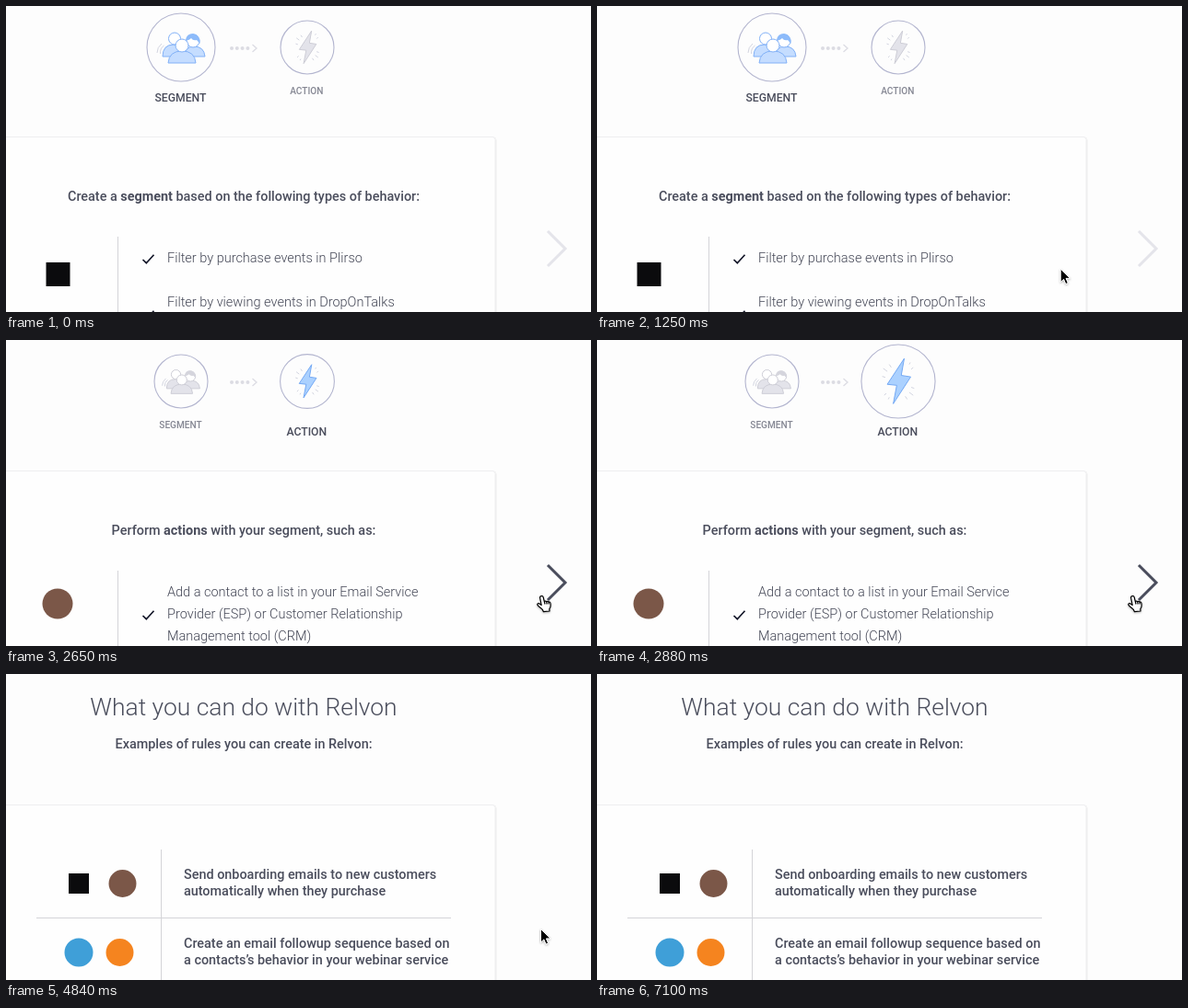
Recreate the animation shown at these times as an HTML page. Size 635 by 333 pixels, loop 7540 ms.

```html
<!DOCTYPE html>
<html lang="en">
<head>
<meta charset="utf-8">
<title>Segments and actions</title>
<style>
  html, body { margin: 0; width: 100%; height: 100%; overflow: hidden; background: #fdfdfd; }
  svg { display: block; }
  text { font-family: Roboto, Inter, "Liberation Sans", sans-serif; fill: #4a4d5c; }
  .title { font-size: 26.4px; font-weight: 300; text-anchor: middle; }
  .lead { font-size: 14.4px; font-weight: 450; text-anchor: middle; }
  .lead tspan { font-weight: 700; }
  .body { font-size: 14.5px; font-weight: 300; fill: #434655; }
  .row { font-size: 14.4px; font-weight: 450; }
  .label { font-size: 10.1px; font-weight: 500; fill: #858793; text-anchor: middle; }
  .label.on { font-size: 12.2px; fill: #4a4d5c; }
  .line { fill: none; stroke: #d4d4d8; }
  .check { fill: none; stroke: #15182a; stroke-width: 1.7; }
  .icon * { vector-effect: non-scaling-stroke; }
  .icon { --fill: #e3e3ea; --edge: #cdcdd6; --hair: #d5d5dd; }
  .icon.on { --fill: #c5ddff; --edge: #82b1f7; --hair: #8dbbfa; }
  .bolt.on { --fill: #abd1ff; --edge: #74a9f4; }
  .ring { fill: #fdfdfd; stroke: #b3b5cf; stroke-width: 1.1; }
  .part { fill: var(--fill); stroke: var(--edge); }
  .head { fill: #fff; stroke: var(--edge); }
  .hair { fill: var(--hair); }
  .spark { fill: none; stroke: #d3d5e0; }
</style>
</head>
<body>
<svg width="635" height="333" viewBox="0 0 635 333">
  <defs>
    <path id="tick" d="M148.5 276 L152.3 279.7 L160.5 270.7"/>
    <filter id="soft" x="-5%" y="-5%" width="110%" height="110%">
      <feDropShadow dx=".5" dy=".5" stdDeviation=".6" flood-color="#000" flood-opacity=".13"/>
    </filter>
    <filter id="drop" x="-40%" y="-30%" width="190%" height="180%">
      <feDropShadow dx="0" dy="1" stdDeviation=".8" flood-color="#000" flood-opacity=".3"/>
    </filter>
  </defs>

  <rect x="-20" y="142.5" width="551" height="230" rx="3" fill="#fefefe" stroke="#eeeef0" filter="url(#soft)"/>

  <g id="steps">
    <g id="people" class="icon">
      <circle class="ring" r="37"/>
      <path class="spark" d="M-26 6 Q-26 0 -21 -4 M-22.500 7 Q-23 1 -18.500 -2"/>
      <path class="part" d="M-20 10 Q-20 -3 -8 -3 Q0 -3 2 10Z"/>
      <path class="part" d="M4 10 Q4 -1 14 -1 Q25 -1 26 10Z"/>
      <circle class="head" cx="-7" cy="-9.500" r="6.500"/>
      <circle class="head" cx="13" cy="-7" r="7"/>
      <path class="hair" d="M5 -8 Q6 -15 13 -15 Q21 -14 20.500 -4 L17 -8 Q13 -7 11 -10 Q8 -7 5 -8Z"/>
      <path class="part" d="M-14 17 Q-13 4 1 4 Q15 4 16 17Z"/>
      <circle class="head" cx="1" cy="-2" r="7"/>
    </g>
    <g id="bolt" class="icon bolt">
      <circle class="ring" r="37"/>
      <path class="spark" d="M-11 -10 l-4 -3 M-13 -4 l-3 -1 M-7 -14 l-2 -3 M11 11 l4 3 M13 6 l3 1 M7 15 l2 3 M-12 12 l-2 2 M-9 16 l-1 2 M13 -12 l2 -2 M11 -17 l1 -2"/>
      <path class="part" d="M6 -23 L-11 3 L-1.500 4 L-5 22.500 L12.500 -4.500 L3 -6Z"/>
    </g>
    <g fill="#dcdce3">
      <circle cx="245" cy="46" r="2"/><circle cx="250.800" cy="46" r="2"/>
      <circle cx="256.600" cy="46" r="2"/><circle cx="262.400" cy="46" r="2"/>
    </g>
    <path d="M267.500 42 L272 46 L267.500 50" fill="none" stroke="#dcdce3" stroke-width="1.300"/>
    <text id="peopleLabel" class="label" x="189.500">SEGMENT</text>
    <text id="boltLabel" class="label" x="326.300">ACTION</text>
    <path class="line" d="M121.500 251 V333"/>
    <path id="next" d="M588 245 L607 264 L588 283" fill="none" stroke-width="3"/>
  </g>

  <g id="segment">
    <text class="lead" x="258" y="212">Create a <tspan>segment</tspan> based on the following types of behavior:</text>
    <rect x="43.500" y="279" width="26" height="26" fill="#0b0b0d"/>
    <use href="#tick" class="check"/>
    <use href="#tick" class="check" y="61"/>
    <text class="body" x="175" y="279">Filter by purchase events in Plirso</text>
    <text class="body" x="175" y="327">Filter by viewing events in DropOnTalks</text>
  </g>

  <g id="action">
    <text class="lead" x="258" y="212">Perform <tspan>actions</tspan> with your segment, such as:</text>
    <circle cx="56" cy="287" r="16.500" fill="#7b5748"/>
    <use href="#tick" class="check" y="24"/>
    <text class="body" x="175" y="279">Add a contact to a list in your Email Service</text>
    <text class="body" x="175" y="303">Provider (ESP) or Customer Relationship</text>
    <text class="body" x="175" y="327">Management tool (CRM)</text>
  </g>

  <g id="rules">
    <text class="title" x="258" y="45">What you can do with Relvon</text>
    <text class="lead" x="258" y="81">Examples of rules you can create in Relvon:</text>
    <path class="line" d="M168.500 191 V333 M33 265.500 H483"/>
    <rect x="68" y="217" width="22" height="22" fill="#0b0b0d"/>
    <circle cx="126.500" cy="228" r="15" fill="#7b5748"/>
    <circle cx="79" cy="303" r="15.500" fill="#3f9fd8"/>
    <circle cx="123.500" cy="303" r="15" fill="#f5841f"/>
    <text class="row" x="193" y="223">Send onboarding emails to new customers</text>
    <text class="row" x="193" y="241">automatically when they purchase</text>
    <text class="row" x="193" y="298">Create an email followup sequence based on</text>
    <text class="row" x="193" y="316">a contacts’s behavior in your webinar service</text>
  </g>

  <g id="cursor" filter="url(#drop)">
    <path id="arrow" d="M0 0 V14.500 L3.400 11.400 L5.600 16.600 L8.100 15.500 L5.900 10.400 H10.400Z" fill="#000" stroke="#fff"/>
    <path id="hand" transform="translate(-4.500 0)" fill="#fff" stroke="#000" stroke-width="1.200" stroke-linejoin="round"
      d="M5 1.200 Q6.800 .800 7.200 2.600 L8.300 7 Q9.600 6 10.600 7.200 Q12 6.400 12.900 7.600 Q14.600 7 15 9 Q15.600 13 13.800 15.200 L14 17.500 L7.500 18.200 Q6.500 15.500 4 13.800 Q1.500 12 .800 10.400 Q1 8.600 3 9.400 L5.200 11 L3.600 3 Q3.400 1.600 5 1.200Z M8.300 7 L9 10 M10.600 7.200 L11.200 10 M12.900 7.600 L13.200 10"/>
  </g>
</svg>
<script>
const LOOP = 7540, TO_ACTION = 2650, TO_RULES = 4840;
const $ = id => document.getElementById(id);

const linear = p => p;
const easeOut = p => 1 - (1 - p) ** 2;
const easeIn = p => p ** 1.6;
const smooth = p => p * p * (3 - 2 * p);

// Rows are [time, value, easing towards this row].
const pathX = [[600, 375, linear], [1250, 503, linear], [1300, 513, linear], [1870, 580.5, easeOut],
               [6830, 580.5, linear], [7100, 565, linear]];
const pathY = [[600, 327, linear], [1250, 286, easeOut], [1300, 285.5, linear], [1870, 277.5, smooth],
               [6830, 277.5, linear], [7100, 334, easeIn]];
const pop = [[2700, 29.4, linear], [2950, 42.5, smooth], [3160, 37, smooth]];

function at(keys, t) {
  if (t <= keys[0][0]) return keys[0][1];
  for (let i = 1; i < keys.length; i++) {
    const [t0, v0] = keys[i - 1], [t1, v1, ease] = keys[i];
    if (t < t1) return v0 + (v1 - v0) * ease((t - t0) / (t1 - t0));
  }
  return keys[keys.length - 1][1];
}

function show(id, on) {
  $(id).style.display = on ? "" : "none";
}

function setStep(id, x, radius, on) {
  $(id).setAttribute("transform", `translate(${x} 45) scale(${radius / 37})`);
  $(id).classList.toggle("on", on);
  $(id + "Label").classList.toggle("on", on);
  $(id + "Label").setAttribute("y", on ? 104 : 96);
}

function draw(t) {
  const first = t < TO_ACTION, rules = t >= TO_RULES;
  show("steps", !rules);
  show("segment", first);
  show("action", !first && !rules);
  show("rules", rules);
  setStep("people", 190, first ? 37 : 29, first);
  setStep("bolt", 327, first ? 29 : at(pop, t), !first);

  const x = at(pathX, t), y = at(pathY, t);
  const hover = x > 568 && !rules;
  show("cursor", t >= 600 && t < 7100);
  show("arrow", !hover);
  show("hand", hover);
  $("cursor").setAttribute("transform", `translate(${x} ${y})`);
  $("next").setAttribute("stroke", hover ? "#4a4d5c" : "#e4e4ea");
}

const start = performance.now();
function tick(now) {
  draw(Math.max(0, now - start) % LOOP);
  requestAnimationFrame(tick);
}
draw(0);
requestAnimationFrame(tick);
</script>
</body>
</html>
```
